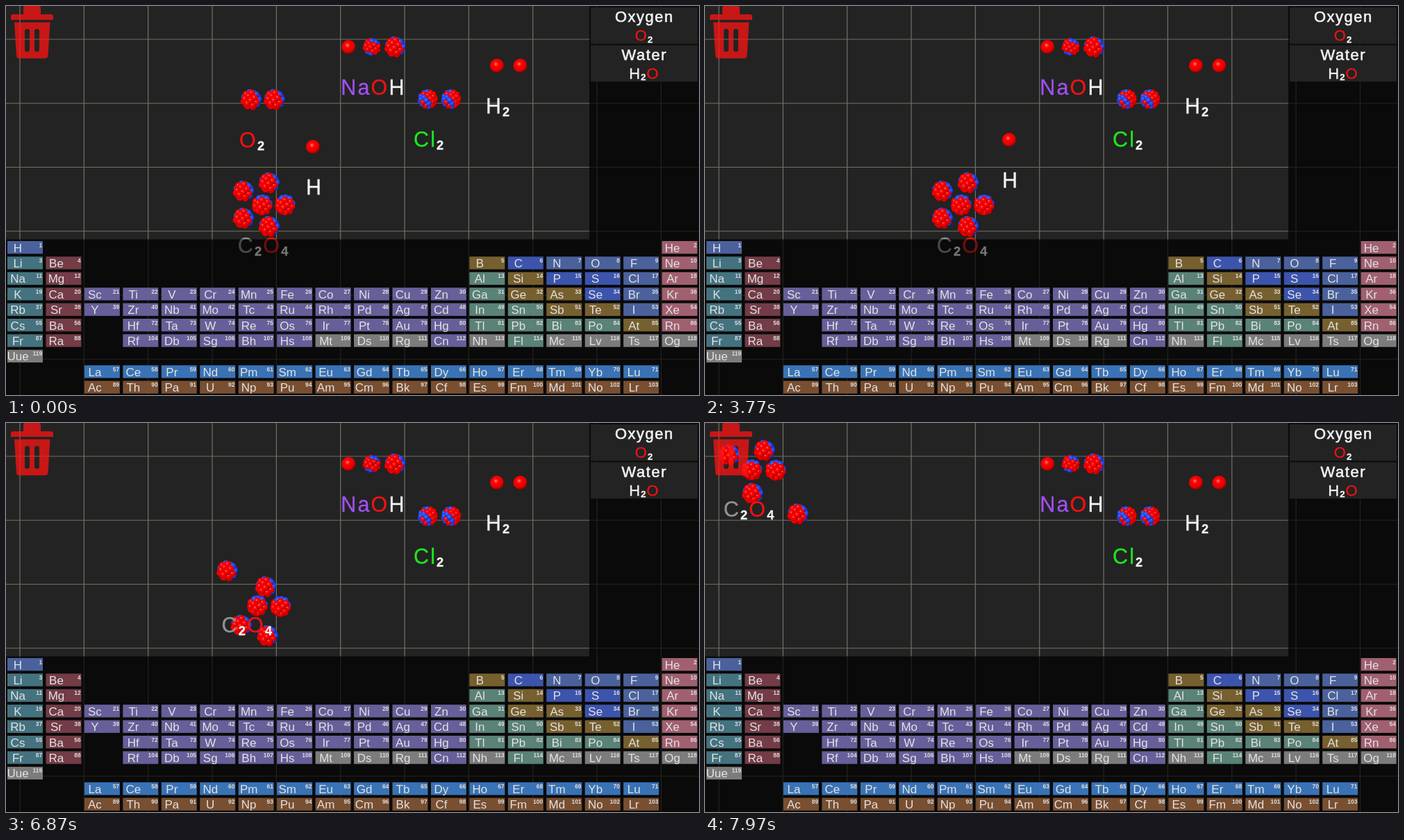
An HTML page that plays this animation: 998 by 561 pixels, repeating every 8 s.

```html
<!DOCTYPE html>
<html lang="en">
<head>
<meta charset="utf-8">
<title>Molecule table</title>
<style>
  html, body { margin: 0; width: 100%; height: 100%; overflow: hidden; background: #0a0a0a; }
  svg { display: block; width: 998px; height: 561px; font-family: "Liberation Sans", Arial, sans-serif; }
  .formula { text-anchor: middle; stroke-width: .3px; }
  .formula .sub { font-weight: bold; font-size: .6em; }
</style>
</head>
<body>
<svg id="stage" viewBox="0 0 998 561">
  <defs>
    <radialGradient id="red" cx=".42" cy=".38" r=".62">
      <stop offset="0" stop-color="#ff9c9c"/><stop offset=".16" stop-color="#ff2a2a"/>
      <stop offset=".35" stop-color="#fc0000"/><stop offset=".75" stop-color="#e60000"/>
      <stop offset="1" stop-color="#8c0000"/>
    </radialGradient>
    <radialGradient id="blue" cx=".42" cy=".38" r=".62">
      <stop offset="0" stop-color="#7f9cff"/><stop offset=".2" stop-color="#2f58ff"/>
      <stop offset=".7" stop-color="#1f42e6"/><stop offset="1" stop-color="#0c1c84"/>
    </radialGradient>
    <mask id="dimBelow" maskUnits="userSpaceOnUse" x="0" y="0" width="998" height="561">
      <rect width="998" height="336.5" fill="#fff"/>
      <rect y="336.5" width="998" height="225" fill="#777"/>
    </mask>
  </defs>
</svg>
<script>
const LOOP = 8000, STEP = 5;
const stage = document.getElementById("stage");

function add(parent, tag, attrs = {}, text) {
  const node = document.createElementNS("http://www.w3.org/2000/svg", tag);
  for (const key in attrs) node.setAttribute(key, attrs[key]);
  if (text !== undefined) node.textContent = text;
  parent.appendChild(node);
  return node;
}
const place = (node, x, y) => node.setAttribute("transform", `translate(${x.toFixed(2)} ${y.toFixed(2)})`);

// Board, grid and the dark frame around the work area
add(stage, "rect", { width: 998, height: 561, fill: "#232323" });
let grid = "";
for (let x = 20; x < 998; x += 92.35) grid += `M${x} 0V561`;
for (let y = 48; y < 561; y += 92.25) grid += `M0 ${y}H998`;
add(stage, "path", { d: grid, stroke: "#747164", "stroke-width": 1.2 });
add(stage, "path", { d: "M840 0H998V561H0V336.5H840Z", fill: "#000", opacity: .7 });

// Periodic table
const symbols = ("H He Li Be B C N O F Ne Na Mg Al Si P S Cl Ar K Ca Sc Ti V Cr Mn Fe Co Ni Cu Zn Ga Ge As Se Br Kr " +
  "Rb Sr Y Zr Nb Mo Tc Ru Rh Pd Ag Cd In Sn Sb Te I Xe Cs Ba La Ce Pr Nd Pm Sm Eu Gd Tb Dy Ho Er Tm Yb Lu " +
  "Hf Ta W Re Os Ir Pt Au Hg Tl Pb Bi Po At Rn Fr Ra Ac Th Pa U Np Pu Am Cm Bk Cf Es Fm Md No Lr " +
  "Rf Db Sg Bh Hs Mt Ds Rg Cn Nh Fl Mc Lv Ts Og Uue").split(" ");
const groups = [
  ["#794f31", "Ac Th Pa U Np Pu Am Cm Bk Cf Es Fm Md No Lr"],
  ["#3973b5", "La Ce Pr Nd Pm Sm Eu Gd Tb Dy Ho Er Tm Yb Lu"],
  ["#7c7c7c", "Mt Ds Rg Nh Mc Lv Ts Og Uue"],
  ["#a06070", "He Ne Ar Kr Xe Rn"],
  ["#44727f", "Li Na K Rb Cs Fr"],
  ["#733c46", "Be Mg Ca Sr Ba Ra"],
  ["#77602f", "B Si Ge As Sb Te At"],
  ["#3c54ac", "C P S Se"],
  ["#4a619c", "H N O F Cl Br I"],
  ["#5a8277", "Al Ga In Sn Tl Pb Bi Po Fl"]
].map(([color, members]) => [color, members.split(" ")]);
const cellColor = symbol => (groups.find(([, members]) => members.includes(symbol)) || ["#665f99"])[0];

// Period n holds 2 * floor(n / 2 + 1)^2 elements, filled from both ends of its row
function cellOf(z) {
  let row = 0, before = 0, size;
  while (z > before + (size = 2 * Math.floor((row + 3) / 2) ** 2)) { before += size; row++; }
  const index = z - before - 1;
  if (size === 2 && row === 0) return [index * 17, row];
  if (index < 2) return [index, row];
  if (size === 32 && index < 17) return [index, row + 3];
  return [18 - size + index, row];
}

symbols.forEach((symbol, i) => {
  const [col, row] = cellOf(i + 1);
  const x = 2 + 55.45 * col, y = 339 + 22.4 * row;
  add(stage, "rect", { x, y, width: 51, height: 18.3, fill: cellColor(symbol) });
  add(stage, "text", { x: x + 15, y: y + 15.5, "font-size": 17, fill: "#e2e2e2", "text-anchor": "middle" }, symbol);
  add(stage, "text", { x: x + 50.3, y: y + 8.6, "font-size": 8.5, "font-weight": "bold", fill: "#dcdcdc", "text-anchor": "end" }, i + 1);
});

// Formulas
const elementColor = { Na: "#a050f4", O: "#f31212", Cl: "#1ee61e", C: "#929292", H: "#f4f4f4" };
function formula(parent, source, size, spacing) {
  const text = add(parent, "text", { class: "formula", "font-size": size, "letter-spacing": spacing });
  let drop = 0;
  for (const part of source.match(/[A-Z][a-z]?|\d/g)) {
    const sub = part < "A";
    const color = sub ? "#f4f4f4" : elementColor[part];
    const target = sub ? size * .13 : 0;
    add(text, "tspan", { class: sub ? "sub" : "", dy: target - drop, fill: color, stroke: color }, part);
    drop = target;
  }
  return text;
}

// Discovery list
[["Oxygen", "O2"], ["Water", "H2O"]].forEach(([name, source], i) => {
  const y = 2 + 54.5 * i;
  add(stage, "rect", { x: 842, y, width: 154, height: 52.5, fill: "#232323" });
  add(stage, "text", {
    x: 919.3, y: y + 21, "font-size": 22, "letter-spacing": 1.5, "text-anchor": "middle",
    fill: "#f4f4f4", stroke: "#f4f4f4", "stroke-width": .6
  }, name);
  place(formula(stage, source, 22, 1), 919, y + 48);
});

// Atoms: balls spread over a sphere, red on the side facing the axis
const nuclei = {
  O: { count: 26, radius: 10.6, ball: 5.1, axis: [-.3, .45, .84], limit: -.05, turn: .4 },
  Cl: { count: 38, radius: 10.6, ball: 4.2, axis: [.6, .3, .5], limit: -.1, turn: 1.1, mix: 4 },
  Na: { count: 28, radius: 9.3, ball: 4, axis: [-.1, .5, .2], limit: 0, turn: 2, mix: 3 }
};
nuclei.C = { ...nuclei.O, turn: 1.5 };

function drawAtom(parent, kind) {
  const atom = add(parent, "g");
  if (kind === "H") {
    add(atom, "circle", { r: 10, fill: "url(#red)" });
    return atom;
  }
  const { count, radius, ball, axis, limit, turn, mix } = nuclei[kind];
  const balls = Array.from({ length: count }, (_, i) => {
    const y = 1 - (2 * i + 1) / count, ring = Math.sqrt(1 - y * y), angle = i * 2.39996 + turn;
    const p = [ring * Math.cos(angle), y, ring * Math.sin(angle)];
    const facing = p.reduce((sum, v, k) => sum + v * axis[k], 0) > limit;
    return { p, red: mix && i % mix === 0 ? !facing : facing };
  }).sort((a, b) => a.p[2] - b.p[2]);
  for (const { p, red } of balls)
    add(atom, "circle", { cx: p[0] * radius, cy: p[1] * radius, r: ball, fill: `url(#${red ? "red" : "blue"})` });
  return atom;
}

// Molecules: the first atom is dragged, the others trail it at their own rate.
// The label hangs below the anchor atom and keeps its offset to the dragged one.
const GAP = 33.5;
const row = (name, x, y, kinds, more) =>
  ({ name, x, y, anchor: 0, drags: [], until: LOOP, atoms: kinds.map((kind, i) => [kind, i * GAP, 0, .002]), ...more });

const molecules = [
  row("NaOH", 493.3, 59, ["H", "Na", "O"], { anchor: 1 }),
  row("H2", 707, 86, ["H", "H"]),
  row("Cl2", 607.5, 134.5, ["Cl", "Cl"]),
  row("O2", 353, 135, ["O", "O"], { until: 3765, drags: [
    { from: 2440, to: 2470, x: 360.5, y: 136 },
    { from: 2470, to: 3270, x: 41, y: 42, skew: [.45, .45] }
  ] }),
  row("H", 442, 203, ["H"], { until: 5625, drags: [
    { from: 3735, to: 3770, x: 438, y: 193 },
    { from: 4770, to: 5470, x: 45, y: 41, skew: [.45, .52] }
  ] }),
  row("C2O4", 342, 267, [], {
    anchor: 2,
    atoms: [["O", 0, 0], ["O", 37, -12, .0045], ["C", 27, 20, .0064], ["C", 60, 20, .0059], ["O", 0, 39, .003], ["O", 37, 51, .0021]],
    drags: [
      { from: 5840, to: 5870, x: 343, y: 264 },
      { from: 6640, to: 7470, x: 52, y: 50, skew: [1.35, .9] },
      { from: 7490, to: 7900, x: 35, y: 46 }
    ]
  })
];

const clamp = v => Math.min(1, Math.max(0, v));
const smooth = u => u * u * (3 - 2 * u);

function leadAt({ x, y, drags }, t) {
  for (const drag of drags) {
    const u = clamp((t - drag.from) / (drag.to - drag.from)), [skewX, skewY] = drag.skew || [1, 1];
    x += (drag.x - x) * smooth(u ** skewX);
    y += (drag.y - y) * smooth(u ** skewY);
  }
  return [x, y];
}

// Positions of a trailing atom, one per step of the loop
function trail(molecule, [, dx, dy, rate]) {
  let x = molecule.x + dx, y = molecule.y + dy;
  return Array.from({ length: LOOP / STEP + 2 }, (_, i) => {
    const [leadX, leadY] = leadAt(molecule, i * STEP), pull = 1 - Math.exp(-rate * STEP);
    x += (leadX + dx - x) * pull;
    y += (leadY + dy - y) * pull;
    return [x, y];
  });
}
function trailAt(path, t) {
  const i = Math.floor(t / STEP), u = t / STEP - i;
  return [0, 1].map(k => path[i][k] + (path[i + 1][k] - path[i][k]) * u);
}

const atomLayer = add(stage, "g");
const labelLayer = add(stage, "g", { mask: "url(#dimBelow)" });
for (const molecule of molecules) {
  const { atoms, anchor, name } = molecule;
  molecule.group = add(atomLayer, "g");
  molecule.nodes = atoms.map(([kind]) => drawAtom(molecule.group, kind));
  molecule.paths = atoms.slice(1).map(atom => trail(molecule, atom));
  molecule.text = formula(labelLayer, name, 30.5, 2.2);
  molecule.offset = [atoms[anchor][1] + 2.2, atoms[anchor][2] + 68.7];
}

// Trash can
const slot = x => `M${x} 36V63q0 3 3.5 3t3.5 -3V36q0 -3 -3.5 -3t-3.5 3Z`;
add(stage, "path", {
  d: "M25 12V3Q25 0 28 0H47Q50 0 50 3V12H65Q68 12 68 15V20H7V15Q7 12 10 12Z" +
    "M12 23.5H63.5L60.5 72Q60 75.5 56.5 75.5H19Q15.5 75.5 15 72Z" + slot(27) + slot(41),
  fill: "#ff1414", "fill-rule": "evenodd", opacity: .75
});

function render(t) {
  for (const molecule of molecules) {
    const { group, nodes, paths, text, offset, until } = molecule;
    group.style.display = text.style.display = t < until ? "inline" : "none";
    const [x, y] = leadAt(molecule, t);
    place(nodes[0], x, y);
    place(text, x + offset[0], y + offset[1]);
    paths.forEach((path, i) => place(nodes[i + 1], ...trailAt(path, t)));
  }
}

const start = performance.now();
function tick() {
  render((performance.now() - start) % LOOP);
  requestAnimationFrame(tick);
}
tick();
</script>
</body>
</html>
```
